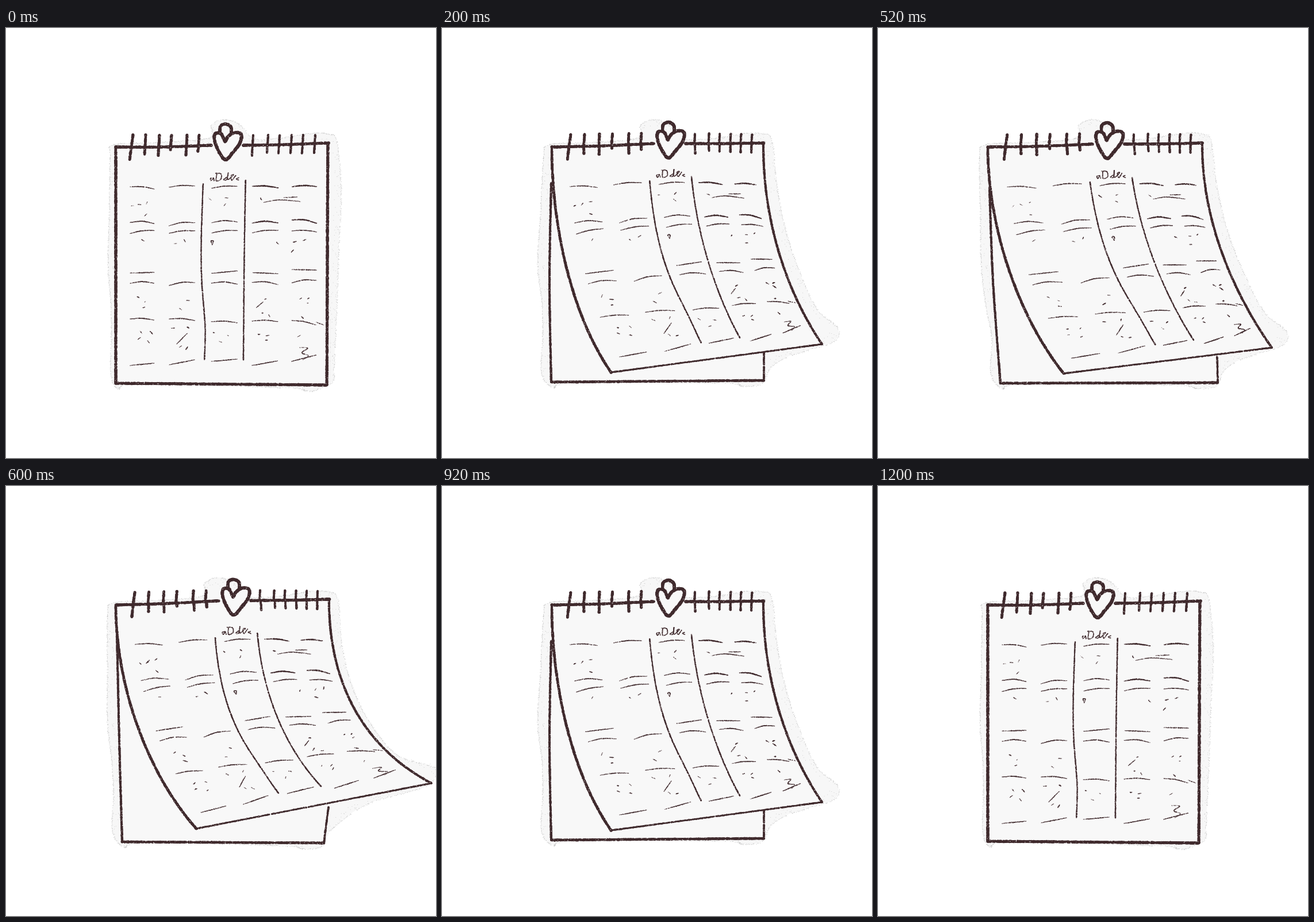
Write an HTML page with a canvas that moves like this. It is 748 by 748 pixels and loops after 1400 ms.

```html
<!DOCTYPE html>
<html lang="en">
<head>
<meta charset="utf-8">
<title>Calendar page turning</title>
<style>
html, body { margin: 0; width: 100%; height: 100%; overflow: hidden; background: #fff; }
canvas { display: block; }
</style>
</head>
<body>
<canvas id="stage" width="748" height="748"></canvas>
<script>
const ctx = document.getElementById('stage').getContext('2d');
const INK = '#402b2e', PAPER = '#f8f8f8', SHADE = '#f7f7f7';
const STEP = 200;

// Sides of the page as Bezier curves that start straight down.
const makePose = (l2, l3, r0, r2, r3, rest) => ({
  left: [[191, 207], [191, 345], l2, l3],
  right: [r0, [r0[0] - 1, r0[1] + 137], r2, r3],
  ...rest
});
const flat = makePose([191, 481], [191, 618], [560, 200], [559, 481], [558, 621],
  { bulge: [0, 0, 0], lift: 0, pad: [26, 12], bump: 380, sheet: [[190, 207], [189, 412], [191, 618], [558, 621]] });
const mid = makePose([225, 499], [294, 599], [559, 200], [600, 460], [661, 550],
  { bulge: [12, 11, 0], lift: 1, pad: [17, 27], bump: 368, sheet: [[190, 270], [187, 440], [190, 616], [560, 613], [560, 563]] });
const wide = makePose([243, 501], [323, 601], [564, 200], [620, 464], [685, 556],
  { bulge: [14, 17, 0], lift: .7, pad: [18, 25], bump: 372, sheet: [[194, 278], [200, 440], [213, 618], [591, 617], [590, 572]] });
const far = makePose([244, 498], [331, 596], [562, 197], [616, 452], [740, 517],
  { bulge: [12, 28, -41], lift: 1, pad: [18, 4], bump: 368, sheet: [[192, 212], [197, 440], [202, 619], [553, 621], [561, 558]] });
const drift = { ...mid, move: [.98, .006, -.008, 1.008, -1.6, -.8] };
const poses = [flat, mid, wide, far, mid, drift, flat];

// Ruled lines: x range of each column, then start and end heights row by row.
const columns = [[215, 257], [283, 328], [357, 402], [428, 473], [497, 540]];
const bows = [-2, -3, -2, 0, -3, -2, 0];
const heights = [
  [276, 280, 338, 340, 357, 352, 426, 425, 444, 444, 506, 508, 587, 583],
  [277, 275, 344, 339, 357, 353, 0, 0, 448, 443, 506, 509, 586, 577],
  [279, 276, 339, 338, 357, 353, 427, 423, 444, 446, 511, 513, 580, 576],
  [276, 279, 340, 340, 357, 353, 426, 428, 443, 447, 510, 511, 587, 579],
  [277, 277, 335, 341, 354, 356, 421, 422, 444, 440, 509, 517, 580, 569]
];
const extras = [[[448, 304], [475, 300], [512, 303]], [[483, 296], [506, 295]], [[540, 512], [553, 517]],
  [[315, 531], [296, 550]], [[447, 477], [435, 487]], [[511, 556], [525, 557], [515, 565], [526, 570], [517, 577]]];

// Centres of the small marks.
const marks = [
  [231, 307], [244, 304], [219, 309], [242, 325], [237, 369], [229, 468], [241, 476], [239, 486], [234, 529],
  [252, 530], [231, 540], [247, 546], [310, 370], [294, 375], [316, 474], [303, 489], [316, 521], [290, 522],
  [303, 554], [314, 557], [354, 298], [383, 296], [380, 308], [361, 530], [373, 546], [386, 535], [443, 298],
  [472, 375], [451, 472], [446, 496], [458, 501], [440, 533], [455, 535], [453, 543], [519, 370], [502, 373],
  [498, 389], [513, 471], [526, 471], [525, 479], [516, 504], [510, 536]
];
const dividers = [[[342, 272], [339, 370], [340, 440], [346, 520], [345, 577]], [[416, 265], [414, 400], [413, 577]]];
const scrawl = [
  [[360, 261], [355, 262], [356, 266], [360, 262], [361, 266]],
  [[366, 254], [365, 266], [373, 263], [373, 254], [364, 253]],
  [[383, 260], [378, 264], [383, 264], [386, 252], [385, 264], [395, 256], [391, 257], [392, 265], [399, 257]],
  [[404, 261], [400, 263], [404, 265]],
  [[358, 376], [356, 371], [360, 371], [358, 377]]
];
// Binding wires: x and lower end.
const wires = [[217, 229], [241, 220], [265, 222], [286, 212], [313, 221], [334, 215],
  [428, 222], [454, 217], [474, 218], [495, 218], [515, 218], [536, 218]];
const heart = [[380, 198], [373, 184], [363, 184], [362, 197], [370, 216], [381, 229],
  [394, 216], [406, 200], [408, 185], [397, 182], [386, 188], [380, 198]];
const ring = [[371, 183], [372, 171], [381, 167], [390, 172], [391, 182]];

let seed, pose;
const rand = () => (seed = seed * 16807 % 2147483647) / 2147483647;
const jitter = a => (rand() - .5) * a;
const mix = (a, b, t) => a + (b - a) * t;

function bezier(p, t) {
  const s = 1 - t, w = [s * s * s, 3 * s * s * t, 3 * s * t * t, t * t * t];
  return [0, 1].map(k => p.reduce((sum, q, i) => sum + q[k] * w[i], 0));
}

// Moves a point of the flat page onto the curled page.
function warp([x, y]) {
  const u = (x - 190) / 369, top = 207 - 7 * u, bottom = 618 + 3 * u;
  const v = (y - top) / (bottom - top), w = Math.max(0, v);
  const a = bezier(pose.left, w), b = bezier(pose.right, w);
  const [c0, c1, c2] = pose.bulge, arch = Math.sin(Math.PI * u);
  return [
    mix(a[0], b[0], u) + (c0 + c1 * Math.sqrt(w) + c2 * w) * arch,
    mix(a[1], b[1], u) - pose.lift * (3 + 5 * Math.sin(4.1 * w)) * arch + Math.min(0, y - top)
  ];
}

// Catmull-Rom curve, sampled about once per pixel.
function smooth(pts, closed) {
  const n = pts.length, out = [];
  const at = i => closed ? pts[(i + n) % n] : pts[Math.max(0, Math.min(n - 1, i))];
  for (let i = 0; i < (closed ? n : n - 1); i++) {
    const [a, b, c, d] = [-1, 0, 1, 2].map(k => at(i + k));
    const steps = Math.max(2, Math.ceil(Math.hypot(c[0] - b[0], c[1] - b[1])));
    for (let j = 0; j < steps; j++) {
      const t = j / steps;
      out.push([0, 1].map(k => b[k] + .5 * t * (c[k] - a[k] +
        t * (2 * a[k] - 5 * b[k] + 4 * c[k] - d[k] + t * (3 * (b[k] - c[k]) + d[k] - a[k])))));
    }
  }
  if (!closed) out.push(pts[n - 1]);
  return out;
}

function dot(x, y, r, color) {
  ctx.fillStyle = color;
  ctx.beginPath();
  ctx.arc(x, y, r, 0, 7);
  ctx.fill();
}

function fill(pts, color) {
  ctx.fillStyle = color;
  ctx.beginPath();
  pts.forEach(p => ctx.lineTo(...p));
  ctx.fill();
}

// Crayon stroke: uneven dabs, tapered if asked, with small chips of paper.
function ink(pts, width, taper) {
  const n = pts.length;
  pts.forEach(([x, y], i) => {
    const t = i / (n - 1);
    const r = width / 2 * (.82 + rand() * .3) * (taper ? .55 + .45 * Math.sin(Math.PI * t) : 1);
    if (rand() > .06) dot(x + jitter(.5), y + jitter(.5), r, INK);
  });
  pts.forEach(([x, y]) => {
    if (rand() < .13) dot(x + jitter(width * 1.1), y + jitter(width * 1.1), .3 + rand() * .4, PAPER);
  });
}
const onPage = (pts, width, taper) => ink(smooth(pts).map(warp), width, taper);

// Pale smudge around the whole calendar with a grainy rim.
function halo({ sheet, right, pad, bump, lift }) {
  const [, side, [lx, ly], [bx, by]] = sheet, [rx, ry] = right[3], gap = lift ? 19 : 10;
  const edge = smooth([
    [186, 203], [186 - gap * .5, 225], [mix(186, side[0], .5) - gap * .8, 320], [side[0] - gap - 2, 410],
    [side[0] - gap * .7, 480], [lx - gap * .8, 540], [lx - gap * .9, 600], [lx + 3, ly + 9], [lx + 40, ly + 1],
    [bx - 80, by + 4], [bx - 35, by + 10],
    ...(lift ? [[bx - 3, by + 5], [bx + 11, by - 22], [mix(bx, rx, .4), mix(by, ry, .65)]] : []),
    [rx - 20, ry + 9], [rx + pad[1] * .8, ry - 6], [rx + pad[1], ry - 28],
    ...[.8, .6, .4, .2].map(t => {
      const [x, y] = bezier(right, t);
      return [x + mix(pad[0], pad[1], t), y - 4];
    }),
    [right[0][0] + 15, 197], [right[0][0], 184], [530, 183], [470, 192], [bump + 50, 192],
    [bump + 27, 168], [bump, 159], [bump - 23, 169], [bump - 27, 191], [260, 199]
  ], true);
  fill(edge, SHADE);
  ctx.fillStyle = '#bdbdbd';
  edge.forEach(([x, y]) => {
    if (rand() < .6) ctx.fillRect(x + jitter(2), y + jitter(2), .9, .9);
    if (rand() < .2) ctx.fillRect(mix(x, 380, rand() * .06), mix(y, 400, rand() * .06), .8, .8);
  });
}

function drawSheet({ sheet, right }) {
  const [a, b, c, d, e] = sheet;
  fill([...sheet, right[0]], PAPER);
  ink(smooth([a, b, c]), 4);
  ink(smooth([c, d]), 4.6);
  ink(smooth([d, e]), 3.6);
}

function drawPage({ left, right, lift }) {
  const ts = Array.from({ length: 430 }, (_, i) => i / 429);
  const l = ts.map(t => bezier(left, t)), r = ts.map(t => bezier(right, t));
  fill([...l, ...r.slice().reverse()], PAPER);
  ink(l, lift ? 4.6 : 5);
  ink(smooth([left[3], right[3]]), lift ? 3.1 : 5);
  ink(r, lift ? 4 : 5);
  onPage([[190, 207], [270, 207], [356, 204]], 5);
  onPage([[411, 204], [480, 203], [560, 200]], 5);
}

function drawNotes() {
  columns.forEach(([x1, x2], c) => bows.forEach((bow, row) => {
    const y1 = heights[c][row * 2], y2 = heights[c][row * 2 + 1];
    if (y1) onPage([[x1, y1], [(x1 + x2) / 2, (y1 + y2) / 2 + bow], [x2, y2]], c > 2 && row < 2 ? 2.6 : 2, true);
  }));
  extras.forEach(line => onPage(line, 1.8, true));
  marks.forEach(([x, y]) => {
    const dx = 1 + rand() * 2, dy = jitter(5);
    onPage([[x - dx, y - dy], [x + dx, y + dy]], 1.3 + rand(), true);
  });
  dividers.forEach(line => onPage(line, 2.4));
  scrawl.forEach(line => onPage(line, 1.8));
}

function drawBinding() {
  wires.forEach(([x, y], i) => {
    const lean = i ? 1 : 3;
    onPage([[x + lean, 186], [x - lean, y]], i < 6 ? 4.8 : 4);
  });
  const [hx, hy] = warp([381, 204]);
  const shift = line => smooth(line).map(([x, y]) => [x + hx - 381, y + hy - 204]);
  fill(shift(heart), PAPER);
  ink(shift(heart), 5.6);
  ink(shift(ring), 5.6);
}

function draw(p) {
  pose = p;
  seed = 4242;
  ctx.setTransform(1, 0, 0, 1, 0, 0);
  ctx.fillStyle = '#fff';
  ctx.fillRect(0, 0, 748, 748);
  if (p.move) ctx.setTransform(...p.move);
  halo(p);
  if (p.lift) drawSheet(p);
  drawPage(p);
  drawNotes();
  drawBinding();
}

let shown = -1;
function frame(now) {
  const i = Math.floor(now / STEP) % poses.length;
  if (i !== shown) draw(poses[shown = i]);
  requestAnimationFrame(frame);
}
frame(0);
</script>
</body>
</html>
```
